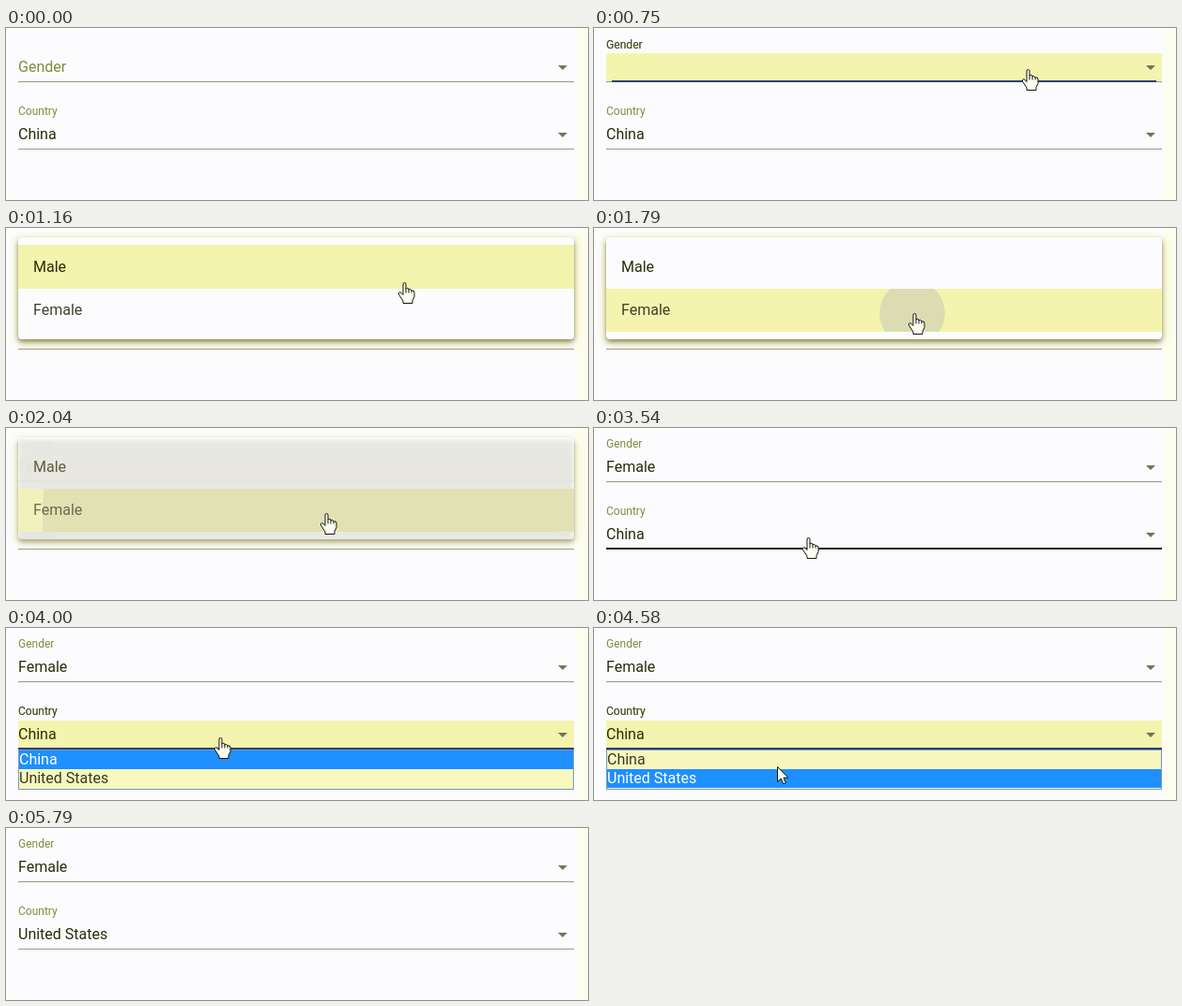
An HTML page with a canvas for the animation above (6950 ms loop, 620 by 184 pixels).

```html
<!DOCTYPE html>
<html lang="en">
<head>
<meta charset="utf-8">
<title>Select fields</title>
<style>
html, body { margin: 0; width: 100%; height: 100%; overflow: hidden; background: #fcfcfe; }
canvas { display: block; width: 620px; height: 184px; }
</style>
</head>
<body>
<canvas id="stage" width="620" height="184"></canvas>
<script>
const ctx = document.getElementById('stage').getContext('2d');
const LOOP = 6950, LEFT = 13, RIGHT = 605, WIDTH = RIGHT - LEFT;
const BG = '#fcfcfe', INK = '#2c2c08', MUTED = '#848a3c', NAVY = '#2c4078', BLUE = '#1e90ff';
const FILL = '#f4f4ae', LINE = '#969a80';

const clamp = v => Math.max(0, Math.min(1, v));
const phase = (t, a, b) => clamp((t - a) / (b - a));
const smooth = p => p * p * (3 - 2 * p);
const easeOut = p => 1 - (1 - p) ** 3;
const mix = (a, b, p) => a + (b - a) * p;
const within = (t, a, b) => t >= a && t < b;

const HAND = new Path2D('M-1.5 12V1.5Q-1.5 0 0 0T1.5 1.5V6.5Q2.5 5 4.5 6.5V7.5Q6.5 6 7.5 8.5Q10.5 7.5 10.5 10.5V15L8.5 19V22H-1.5V19.5L-5.8 13Q-7 10.5-5 10.2Q-3.8 10-1.5 13Z');
const FINGERS = new Path2D('M1.5 6V11M4.5 7V11M7.5 8.5V11');
const ARROW = new Path2D('M0 0V16L3.8 12.6L6.2 18.3L8.8 17.2L6.4 11.7H11.4Z');

// Pointer stops: time, x, y
const STOPS = [
  [[120, 488, 142], [320, 474, 92], [540, 462, 44], [970, 462, 44], [1450, 366, 80], [1540, 366, 80], [1740, 341, 91], [2250, 341, 91]],
  [[3080, 252, 178], [3300, 238, 148], [3540, 228, 117], [4370, 228, 117], [4580, 195, 148], [4830, 188, 158], [5200, 188, 158]]
];

function pointerAt(t) {
  const path = STOPS.find(s => within(t, s[0][0], s[s.length - 1][0]));
  if (!path) return null;
  const i = path.findIndex(s => s[0] > t);
  const [ta, xa, ya] = path[i - 1], [tb, xb, yb] = path[i];
  const p = phase(t, ta, tb);
  return { x: mix(xa, xb, p), y: mix(ya, yb, p) };
}

function alpha(a, draw) {
  if (a <= 0) return;
  ctx.save();
  ctx.globalAlpha *= a;
  draw();
  ctx.restore();
}

function rect(x, y, w, h, color) {
  ctx.fillStyle = color;
  ctx.fillRect(x, y, w, h);
}

function text(str, x, y, color, size = 16) {
  ctx.font = `${size}px Roboto, sans-serif`;
  ctx.fillStyle = color;
  ctx.fillText(str, x, y);
}

function drawField(top, label, value, s) {
  const base = top + 57;
  alpha(s.focus, () => rect(LEFT, top + 27, WIDTH, 30, FILL));
  const size = mix(16, 12, s.float), y = top + mix(47, 21, s.float);
  text(label, LEFT, y, MUTED, size);
  alpha(s.focus, () => text(label, LEFT, y, '#45502c', size));
  text(value, LEFT, top + 47, INK);

  ctx.fillStyle = '#70745a';
  ctx.beginPath();
  ctx.moveTo(588, top + 40);
  ctx.lineTo(598, top + 40);
  ctx.lineTo(593, top + 45);
  ctx.fill();

  rect(LEFT, base, WIDTH, 1, LINE);
  if (s.hover) rect(LEFT, base - 1, WIDTH, 2, '#202006');
  const w = WIDTH * s.line;
  alpha(s.focus, () => rect(LEFT + (WIDTH - w) / 2, base - 1, w, 2, NAVY));
}

function drawMenu(t, pointer) {
  const open = easeOut(phase(t, 830, 960));
  const shown = phase(t, 825, 890) * (1 - phase(t, 2010, 2130));
  if (!shown) return;
  alpha(shown, () => {
    const scale = mix(0.8, 1, open);
    ctx.translate(309, 10);
    ctx.scale(1, scale);
    ctx.translate(-309, -10);
    ctx.beginPath();
    ctx.roundRect(LEFT, 10, WIDTH, 109, 4);
    ctx.fillStyle = BG;
    ctx.shadowColor = 'rgba(215,215,60,.6)';
    ctx.shadowBlur = 12;
    ctx.shadowOffsetY = 3;
    ctx.fill();
    ctx.shadowColor = 'rgba(50,50,20,.5)';
    ctx.shadowBlur = 5;
    ctx.shadowOffsetY = 3;
    ctx.fill();
    ctx.shadowColor = 'transparent';

    const female = pointer && pointer.y >= 65;
    if (t > 900) rect(LEFT, female ? 65 : 18, WIDTH, female ? 46 : 47, FILL);
    if (t > 1740) drawRipple(t);
    text('Male', 29, 47, INK);
    text('Female', 29, 93, '#40402a');
  });
}

function drawRipple(t) {
  ctx.save();
  ctx.beginPath();
  ctx.rect(LEFT, 65, WIDTH, 46);
  ctx.clip();
  ctx.fillStyle = '#dcdcb2';
  ctx.beginPath();
  ctx.arc(339, 91, 300 * phase(t, 1740, 1965) ** 1.45, 0, 7);
  ctx.fill();
  ctx.restore();
}

function drawPopup(t, pointer) {
  if (!within(t, 3870, 5160)) return;
  const second = pointer && pointer.y >= 141;
  rect(LEFT, 130, WIDTH, 43, '#7898b4');
  rect(LEFT + 1, 131, WIDTH - 2, 41, '#f7f7be');
  rect(LEFT + 1, second ? 151 : 131, WIDTH - 2, 20, BLUE);
  text('China', 14, 146, second ? '#3a3a24' : '#fff');
  text('United States', 14, 166, second ? '#fff' : '#3a3a24');
}

function drawPointer(p, arrow) {
  ctx.save();
  ctx.translate(Math.round(p.x) + 0.5, Math.round(p.y) + 0.5);
  ctx.fillStyle = '#fffff4';
  ctx.strokeStyle = '#141408';
  ctx.lineWidth = 1;
  ctx.lineJoin = 'round';
  const shape = arrow ? ARROW : HAND;
  ctx.fill(shape);
  ctx.stroke(shape);
  if (!arrow) ctx.stroke(FINGERS);
  ctx.restore();
}

function draw(t) {
  const pointer = pointerAt(t);
  rect(0, 0, 620, 184, BG);
  rect(608, 0, 11, 184, '#fdfdee');

  const over = (a, b) => pointer && pointer.y > a && pointer.y < b;
  drawField(0, 'Gender', t < 2010 ? '' : 'Female', {
    focus: phase(t, 570, 640) * (1 - phase(t, 2250, 2450)),
    line: easeOut(phase(t, 580, 815)),
    float: smooth(phase(t, 590, 770)),
    hover: t < 580 && over(0, 60)
  });
  drawField(72, 'Country', t < 5160 ? 'China' : 'United States', {
    focus: phase(t, 3790, 3860) * (1 - phase(t, 5500, 5760)),
    line: easeOut(phase(t, 3790, 3990)),
    float: 1,
    hover: !within(t, 580, 3080) && t < 3790 && over(72, 132)
  });
  drawMenu(t, pointer);
  drawPopup(t, pointer);
  if (pointer) drawPointer(pointer, t >= 4370 || (t > 3080 && pointer.y > 132));
}

function tick(now) {
  draw(now % LOOP);
  requestAnimationFrame(tick);
}
requestAnimationFrame(tick);
</script>
</body>
</html>
```
